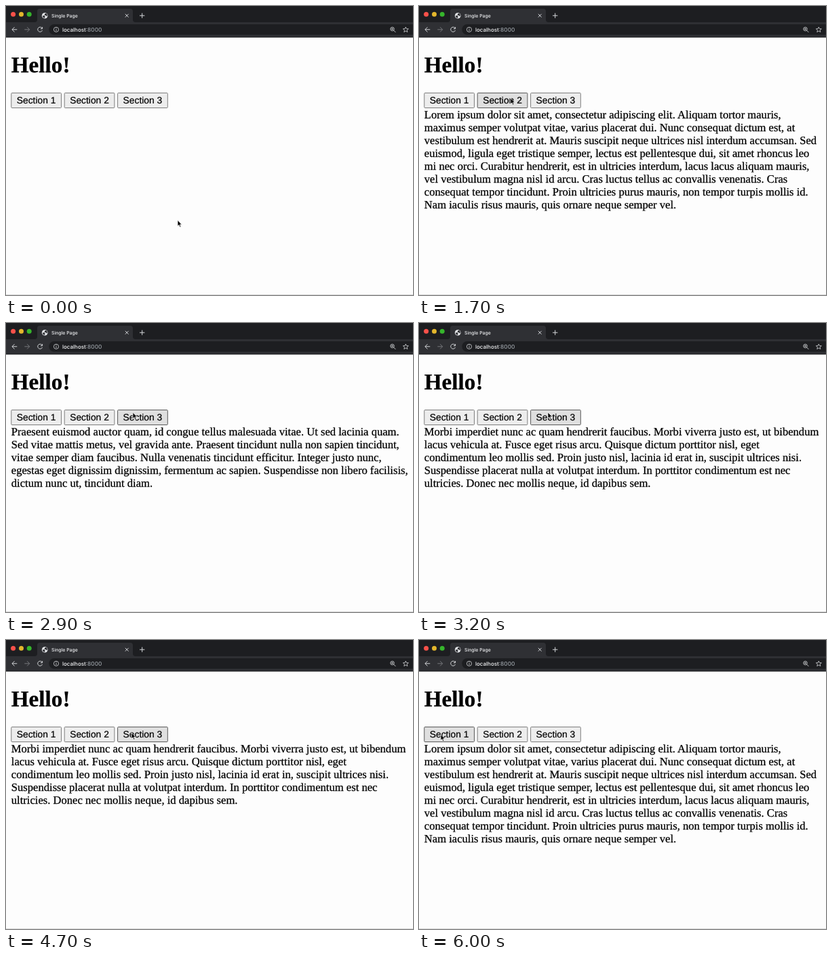
An HTML page for the animation above (6.5 s loop, 600 by 427 pixels).

```html
<!DOCTYPE html>
<html lang="en">
<head>
<meta charset="utf-8">
<title>Single Page</title>
<style>
  html, body { margin: 0; width: 100%; height: 100%; overflow: hidden; background: #fdfdfd; }
  svg { display: block; width: 600px; height: 427px; }
  text { white-space: pre; text-rendering: geometricPrecision; }
  .ui { font-family: Inter, Roboto, sans-serif; font-weight: 500; fill: #f1f2f4; }
  .icon { fill: none; stroke: #d5d7da; stroke-width: 1; }
  .page { font-family: "Liberation Serif", serif; font-size: 16.6px; }
  .page text { stroke: #000; stroke-width: .28; }
  .button rect { fill: #ededed; stroke: #7c7c7c; }
  .button text { font: 13.83px "Liberation Sans", sans-serif; stroke-width: .2; }
  .button.hover rect { fill: #dfdfdf; stroke: #585858; }
  .button.pressed rect { fill: #f4f4f4; stroke: #8a8a8a; }
</style>
</head>
<body>
<svg viewBox="0 0 600 427">
  <rect width="600" height="427" fill="#fdfdfd"/>
  <rect y="426" width="600" height="1" fill="#dcdcdc"/>

  <!-- Browser window -->
  <rect width="600" height="46.600" fill="#1d1e21"/>
  <path d="M0 24H42Q46 24 46 20V8Q46 4 50 4H183Q187 4 187 8V20Q187 24 191 24H600V45.300H0Z" fill="#2f3034"/>
  <path d="M600 27H71a7.700 7.700 0 0 0 0 15.400H600Z" fill="#1d1e21"/>
  <circle cx="10.600" cy="12.200" r="3.500" fill="#f9514a"/>
  <circle cx="22.500" cy="12.200" r="3.500" fill="#e3b62c"/>
  <circle cx="34.200" cy="12.200" r="3.500" fill="#36b52c"/>
  <circle cx="57.200" cy="14.200" r="4.300" fill="#e8eaed"/>
  <path d="M54 14.200h2.500l1.200 1.300v1.300h-1v1.200q-2.800-.7-2.700-3.800ZM57 11h2.600q1.400 1.300 1.300 3.500l-1 1-.9-1.600h-2.300v-1.300h1Z" fill="#2f3034"/>
  <text class="ui" x="67" y="16.800" font-size="6.900">Single Page</text>
  <g class="icon">
    <path d="M175.800 11.800l4.800 4.800m0-4.800l-4.800 4.800M197 14.200h7.400m-3.700-3.700v7.400"/>
    <path d="M16.300 34.800H9m3.500-3.600L8.900 34.800l3.600 3.600"/>
    <path d="M27.300 34.800h7.300m-3.500-3.600l3.600 3.600-3.600 3.600" stroke="#75777b"/>
    <path d="M53 32.500a3.500 3.500 0 1 0 .5 3.500M53.600 31v2.700H51"/>
    <circle cx="74" cy="34.800" r="3.600" stroke-width=".8"/>
    <path d="M74 34.300v2.500m0-4.500v1" stroke-width=".9"/>
    <circle cx="569.500" cy="34" r="2.700" stroke-width=".9"/>
    <path d="M571.500 36l2.900 2.900M568.200 34h2.600m-1.300-1.300v2.600" stroke-width=".9"/>
    <path d="M589.300 31l1.100 2.600 2.900.2-2.200 1.900.7 2.800-2.500-1.500-2.500 1.500.7-2.800-2.200-1.900 2.900-.2Z" stroke-width=".8"/>
  </g>
  <text class="ui" x="83" y="37.800" font-size="8">localhost</text>
  <text class="ui" x="117.600" y="37.800" font-size="8.300" style="fill:#9aa0a6">:8000</text>

  <!-- Page -->
  <g class="page">
    <text x="7.800" y="98.300" font-size="33.200" font-weight="bold">Hello!</text>
    <g id="buttons"></g>
    <g id="sections"></g>
  </g>
  <path id="cursor" d="M0 0V8.800L2 7 3.400 10.300 4.900 9.700 3.500 6.400H6.200Z" stroke="#fff" stroke-width=".7"/>
</svg>

<script>
const SECTIONS = [
  `Lorem ipsum dolor sit amet, consectetur adipiscing elit. Aliquam tortor mauris,
maximus semper volutpat vitae, varius placerat dui. Nunc consequat dictum est, at
vestibulum est hendrerit at. Mauris suscipit neque ultrices nisl interdum accumsan. Sed
euismod, ligula eget tristique semper, lectus est pellentesque dui, sit amet rhoncus leo
mi nec orci. Curabitur hendrerit, est in ultricies interdum, lacus lacus aliquam mauris,
vel vestibulum magna nisl id arcu. Cras luctus tellus ac convallis venenatis. Cras
consequat tempor tincidunt. Proin ultricies purus mauris, non tempor turpis mollis id.
Nam iaculis risus mauris, quis ornare neque semper vel.`,
  `Praesent euismod auctor quam, id congue tellus malesuada vitae. Ut sed lacinia quam.
Sed vitae mattis metus, vel gravida ante. Praesent tincidunt nulla non sapien tincidunt,
vitae semper diam faucibus. Nulla venenatis tincidunt efficitur. Integer justo nunc,
egestas eget dignissim dignissim, fermentum ac sapien. Suspendisse non libero facilisis,
dictum nunc ut, tincidunt diam.`,
  `Morbi imperdiet nunc ac quam hendrerit faucibus. Morbi viverra justo est, ut bibendum
lacus vehicula at. Fusce eget risus arcu. Quisque dictum porttitor nisl, eget
condimentum leo mollis sed. Proin justo nisl, lacinia id erat in, suscipit ultrices nisi.
Suspendisse placerat nulla at volutpat interdum. In porttitor condimentum est nec
ultricies. Donec nec mollis neque, id dapibus sem.`
];
const LOOP = 6500, STEP = 100;
const BUTTON = { x: 7.8, y: 128.5, width: 73.7, height: 22, pitch: 78.4 };

// Cursor stops: time, x, y
const PATH = [
  [0, 253, 316.5], [100, 84, 95], [200, 48, 136], [300, 48, 136],
  [1000, 40, 138], [1200, 40, 138], [1700, 135, 136], [2300, 135, 136],
  [3000, 190, 132], [3200, 190, 132], [3500, 123, 139.5], [3800, 123, 139.5],
  [4200, 185, 137], [4700, 185, 137], [5200, 28, 139.5], [5300, 32, 139.5], [LOOP, 32, 139.5]
];
// Clicks: press time, section index; the section opens on release
const CLICKS = [[1100, 0], [1900, 1], [3100, 2], [3700, 1], [4600, 2], [5700, 0]];

const byId = id => document.getElementById(id);
function add(parent, tag, attributes = {}, content = "") {
  const node = document.createElementNS("http://www.w3.org/2000/svg", tag);
  for (const key in attributes) node.setAttribute(key, attributes[key]);
  node.textContent = content;
  return parent.appendChild(node);
}

const buttons = SECTIONS.map((_, i) => {
  const group = add(byId("buttons"), "g");
  const x = BUTTON.x + i * BUTTON.pitch;
  add(group, "rect", { x, y: BUTTON.y, width: BUTTON.width, height: BUTTON.height, rx: 1 });
  add(group, "text", { x: x + 8, y: 144.2 }, `Section ${i + 1}`);
  return group;
});
const sections = SECTIONS.map(body => {
  const group = add(byId("sections"), "g");
  body.split("\n").forEach((line, i) => add(group, "text", { x: 7.8, y: 166 + 19 * i }, line));
  return group;
});

function cursorAt(time) {
  const next = Math.max(1, PATH.findIndex(stop => stop[0] >= time));
  const [t0, x0, y0] = PATH[next - 1], [t1, x1, y1] = PATH[next];
  const p = (time - t0) / (t1 - t0), eased = p * p * (3 - 2 * p);
  return [x0 + (x1 - x0) * eased, y0 + (y1 - y0) * eased];
}

function render(now) {
  const time = Math.floor(now % LOOP / STEP) * STEP;
  const [x, y] = cursorAt(time);
  const click = CLICKS.find(([at]) => at === time);
  const opened = CLICKS.filter(([at]) => at < time).pop();

  byId("cursor").setAttribute("transform", `translate(${x} ${y})`);
  buttons.forEach((button, i) => {
    const dx = x - BUTTON.x - i * BUTTON.pitch, dy = y - BUTTON.y;
    const hover = dx >= 0 && dx <= BUTTON.width && dy >= 0 && dy <= BUTTON.height;
    const pressed = click && click[1] === i;
    button.setAttribute("class", `button ${pressed ? "pressed" : hover ? "hover" : ""}`);
  });
  sections.forEach((section, i) => {
    section.style.display = opened && opened[1] === i ? "" : "none";
  });
}

const start = performance.now();
function tick() {
  render(performance.now() - start);
  requestAnimationFrame(tick);
}
tick();
</script>
</body>
</html>
```
